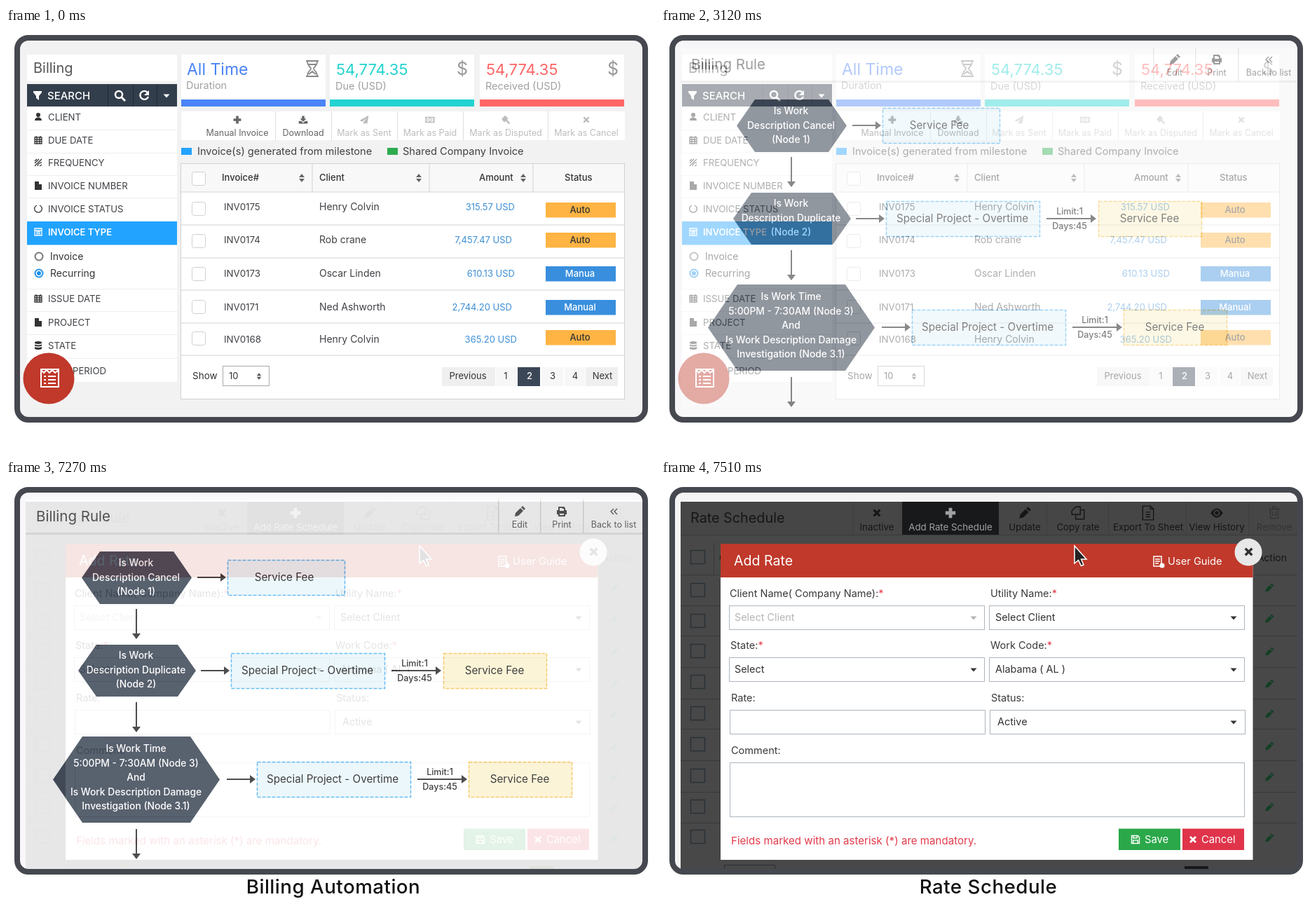
An HTML page for the animation above (8000 ms loop, 926x605 px).

```html
<!DOCTYPE html>
<html lang="en">
<head>
<meta charset="utf-8">
<title>Billing tour</title>
<style>
html, body { margin: 0; width: 100%; height: 100%; overflow: hidden; background: #fff; }
svg { display: block; width: 926px; height: 605px; }
text { font-family: Inter, "Open Sans", sans-serif; white-space: pre; }
</style>
</head>
<body>
<svg id="stage" viewBox="0 0 926 605"></svg>
<script>
const rect = (x, y, w, h, fill, more = '') =>
  `<rect x="${x}" y="${y}" width="${w}" height="${h}" fill="${fill}" ${more}/>`;
const box = (x, y, w, h, stroke, fill = '#fff', more = '') =>
  rect(x + .5, y + .5, w, h, fill, `stroke="${stroke}" ${more}`);
const text = (x, y, str, size, fill = '#3c3c3c', more = '') =>
  `<text x="${x}" y="${y}" font-size="${size}" fill="${fill}" ${more}>${str}</text>`;
const MID = 'text-anchor="middle"', END = 'text-anchor="end"', BOLD = 'font-weight="500"';
const mid = (x, y, str, size, fill, more = '') => text(x, y, str, size, fill, MID + ' ' + more);
const shape = (d, fill) => `<path d="${d}" fill="${fill}"/>`;
const line = (d, stroke, w = 1) => `<path d="${d}" fill="none" stroke="${stroke}" stroke-width="${w}"/>`;
const circle = (x, y, r, fill, more = '') => `<circle cx="${x}" cy="${y}" r="${r}" fill="${fill}" ${more}/>`;
const hline = (x1, x2, y, c) => line(`M${x1} ${y + .5}H${x2}`, c);
const vline = (x, y1, y2, c) => line(`M${x + .5} ${y1}V${y2}`, c);
const each = (list, fn) => list.map(fn).join('');

// Icons are centred on 0,0; the flag tells filled from outlined.
const ICONS = {
  plus: [1, 'M-2-6H2V-2H6V2H2V6H-2V2H-6V-2H-2Z'],
  cross: [1, 'M-5-3L-3-5L0-2L3-5L5-3L2 0L5 3L3 5L0 2L-3 5L-5 3L-2 0Z'],
  download: [1, 'M-2-6H2V-2H5L0 3L-5-2H-2ZM-7 2H-3L0 5L3 2H7V6H-7Z'],
  send: [1, 'M7-7L-7 1L-3 3L4-3L-1 4V7L2 5L5 6Z'],
  gavel: [1, 'M-6-2L-1-7L4-2L2 0L7 5L5 7L0 2L-2 4L-6 0Z'],
  cash: [0, 'M-7-4H7V4H-7ZM-2 0A2 3 0 1 0 2 0A2 3 0 1 0-2 0M-5-4V4M5-4V4'],
  user: [1, 'M-3-3A3 3 0 1 1 3-3A3 3 0 1 1-3-3ZM-5 5C-5-1 5-1 5 5Z'],
  calendar: [0, 'M-5-4H5V5H-5ZM-5-1H5M-5 2H5M-2-4V5M2-4V5M-3-6V-4M3-6V-4'],
  waves: [0, 'M-5 1L1-5M-5 5L5-5M-1 5A6 6 0 0 1 5 0M-5-2L-2-5M2 5L5 3'],
  file: [1, 'M-5-6H1V-2H5V6H-5Z'],
  ring: [0, 'M2-5A5.3 5.3 0 1 1-2-5'],
  form: [0, 'M-5-5H5V5H-5ZM-5-2H5M-3 0H3M-3 2.5H3'],
  stack: [1, 'M-5-5Q0-7 5-5V-3Q0-1-5-3ZM-5-1.5Q0 .5 5-1.5V.5Q0 2.5-5 .5ZM-5 2Q0 4 5 2V5Q0 7-5 5Z'],
  sort: [1, 'M-4-1L0-6L4-1ZM-4 1H4L0 6Z'],
  down: [1, 'M-4.5-2.5H4.5L0 2.5Z'],
  filter: [1, 'M-6-6H6V-4L2 1V7L-2 4V1L-6-4Z'],
  pencil: [1, 'M-7 7L-6 2L1-5L5-1L-2 6ZM2-6L4-8L8-4L6-2Z'],
  printer: [1, 'M-5-7H3L5-5V-2H7V4H5V7H-5V4H-7V-2H-5ZM-3-5V-1H3V-4H1V-5ZM-3 3V5H3V3Z'],
  back: [0, 'M0-4L-4 0L0 4M5-4L1 0L5 4'],
  copy: [0, 'M-3-8H3V2H-8V-3ZM3-4H8V8H-3V2'],
  sheet: [0, 'M-7-9H3L7-5V9H-7ZM3-9V-5H7M-3-1H3M-3 2H3M-3 5H3'],
  eye: [1, 'M-8 0Q0-12 8 0Q0 12-8 0ZM-4 0A4 4 0 1 1 4 0A4 4 0 1 1-4 0ZM-2.5 0A2.500 2.500 0 1 0 2.500 0A2.500 2.500 0 1 0-2.500 0Z'],
  trash: [0, 'M-7-5H7M-2-5V-8H2V-5M-5-5V7H5V-5M-2-2V4M2-2V4'],
  disk: [0, 'M-5-5H3L5-3V5H-5ZM-3-5V-2H2V-5M-3 5V1H3V5'],
  hourglass: [0, 'M-9-11H9M-9 11H9M-7-11C-7-3-2-3-2 0C-2 3-7 3-7 11M7-11C7-3 2-3 2 0C2 3 7 3 7 11M-5-6H5M-5 8L0 4L5 8']
};
function icon(name, x, y, color, k = 1, w = 1.3) {
  const [solid, d] = ICONS[name];
  const art = solid ? `<path d="${d}" fill="${color}" fill-rule="evenodd"/>` : line(d, color, w);
  return `<g transform="translate(${x} ${y}) scale(${k})">${art}</g>`;
}

function invoices() {
  const ink = '#3f4145', grid = '#d2d2d2', pale = '#eee', navy = '#333e4c';
  const cards = [
    [250, 'All Time', 'Duration', '#4a84f7', 258, 23, 87],
    [462, '54,774.35', 'Due (USD)', '#22d3d1', 471, 22, 88],
    [676, '54,774.35', 'Received (USD)', '#ff6666', 685, 22, 88]
  ];
  const side = [
    ['user', 'CLIENT', 132], ['calendar', 'DUE DATE', 165], ['waves', 'FREQUENCY', 197],
    ['file', 'INVOICE NUMBER', 230], ['ring', 'INVOICE STATUS', 263], ['calendar', 'ISSUE DATE', 391],
    ['file', 'PROJECT', 425], ['stack', 'STATE', 458]
  ];
  const tools = [
    ['plus', 'Manual Invoice', 330, '#666'], ['download', 'Download', 424, '#666'],
    ['send', 'Mark as Sent', 511], ['cash', 'Mark as Paid', 605],
    ['gavel', 'Mark as Disputed', 713], ['cross', 'Mark as Cancel', 828]
  ];
  const rows = [
    ['0175', 'Henry Colvin', '315.57', 726, 'Auto', 260, 248, 249],
    ['0174', 'Rob crane', '7,457.47', 722, 'Auto', 307, 294, 292],
    ['0173', 'Oscar Linden', '610.13', 726, 'Manua', 355, 341, 340],
    ['0171', 'Ned Ashworth', '2,744.20', 722, 'Manual', 403, 388, 388],
    ['0168', 'Henry Colvin', '365.20', 729, 'Auto', 449, 433, 431]
  ];
  const pages = [[622, 76, 'Previous', 659], [699, 29, '1', 713], [730, 32, '2', 747],
    [764, 31, '3', 780], [797, 29, '4', 812], [827, 46, 'Next', 851]];
  const check = y => box(265, y, 19, 19, '#d0d0d0', '#fff', 'rx="3"');

  return rect(20, 18, 888, 538, '#f2f2f2') +
    rect(30, 38, 214, 38, '#fff') + text(39, 64, 'Billing', 20, '#555') +
    each(cards, ([x, big, small, c, tx, size, y]) => rect(x, 38, 206, 64, '#fff') +
      rect(x, 102, 206, 10, c) + text(tx, 67, big, size, c) + text(tx - 1, y, small, 14.5, '#a0a0a0')) +
    icon('hourglass', 437, 58, '#888', 1, 1.8) +
    mid(651, 67, '$', 25, '#999') + mid(866, 67, '$', 25, '#999') +
    // search bar
    rect(30, 80, 214, 32, navy) + each([145, 181, 215], x => vline(x, 80, 112, '#222b36')) +
    icon('filter', 45, 96, '#fff') + text(59, 102, 'SEARCH', 15, '#fff', BOLD) +
    circle(161, 95, 5, 'none', 'stroke="#fff" stroke-width="2.5"') + line('M164 98L170 104', '#fff', 3) +
    line('M202 92A6 6 0 1 0 203 98', '#fff', 2.4) + shape('M204 89V96H197Z', '#fff') +
    icon('down', 229, 97, '#fff') +
    // filter list
    rect(30, 112, 214, 393, '#fff') +
    each([145, 178, 210, 242, 372, 404, 437, 471], y => hline(30, 244, y, pale)) +
    each(side, ([name, label, y]) => icon(name, 46, y - 5, '#333') + text(60, y, label, 13.2, ink)) +
    text(95, 494, 'PERIOD', 13.2, ink) +
    rect(30, 276, 214, 33.5, '#22a3ff') + icon('form', 46, 291, '#fff') +
    text(60, 296, 'INVOICE TYPE', 13, '#fff', 'font-weight="600"') +
    circle(47, 326, 5.5, '#fff', 'stroke="#777" stroke-width="2"') + text(63, 331, 'Invoice', 14, '#333') +
    circle(47, 350, 5.5, '#fff', 'stroke="#1d92f0" stroke-width="2"') + circle(47, 350, 3, '#1d92f0') +
    text(63, 355, 'Recurring', 14, '#333') +
    // floating button
    circle(61, 500, 36.5, '#c0392b') +
    line('M50 488V512H75V488M49 487H76M50 488L54 492L58 488L62 492L66 488L70 492L75 488M60 497H71M60 502H71M60 507H71M54 497H57M54 502H57M54 507H57', '#fff', 2) +
    // toolbar and legend
    rect(250, 119, 633, 41, '#fff') +
    each([384, 464, 558, 652, 773], x => vline(x, 119, 160, '#ddd')) +
    each(tools, ([name, label, x, c = '#bdbdbd']) => icon(name, x, 131, c, .9) + mid(x, 154, label, 12.5, c)) +
    rect(250, 171, 15, 10, '#22a3ff') + text(273, 181, 'Invoice(s) generated from milestone', 14.6, ink) +
    rect(544, 171, 15, 10, '#2eab4e') + text(566, 181, 'Shared Company Invoice', 14.6, ink) +
    // table
    box(249, 193, 633, 336, grid) + rect(250, 194, 632, 40, '#f8f8f8') +
    each([234, 281, 328, 374, 421, 467], y => hline(250, 882, y - .5, grid)) +
    each([437, 604, 752], x => vline(x - .5, 194, 234, grid)) +
    each([422, 589, 738], x => icon('sort', x, 214, '#666')) +
    each([['Invoice#', 308], ['Client', 447], ['Amount', 675], ['Status', 797]],
      ([s, x]) => text(x, 218, s, 13, '#333', BOLD)) +
    check(205) +
    each(rows, ([no, name, sum, x, kind, y, cy, by]) => check(cy) +
      text(311, y, 'INV' + no, 13.3, ink) + text(447, y - .5, name, 14, ink) +
      text(x, y - .5, sum + ' USD', 13, '#3d8fd6', END) +
      rect(770, by, 100, 21.5, kind == 'Auto' ? '#ffb443' : '#398fde') +
      mid(819, by + 15, kind, 13, kind == 'Auto' ? '#333' : '#fff', BOLD)) +
    text(266, 501, 'Show', 13.5, '#333') + box(309, 482, 66, 28, '#aaa') +
    text(318, 501, '10', 13, '#333') + icon('sort', 361, 497, '#555', .8) +
    each(pages, ([x, w, s, cx]) => rect(x, 484, w, 27, s == 2 ? '#3b4757' : s > 0 ? '#f7f7f7' : '#efefef') +
      mid(cx, 501, s, 13, s == 2 ? '#fff' : '#333', s == 2 ? BOLD : ''));
}

function rules() {
  const dark = '#333';
  const arrow = (x, y, len, turn = 0) => `<g transform="translate(${x} ${y}) rotate(${turn})">` +
    line(`M0 0H${len - 6}`, dark, 2) + shape(`M${len - 8}-6L${len} 0L${len - 8} 6Z`, dark) + '</g>';
  const hex = (x1, x2, y1, y2, inset, y, lines) => {
    const my = (y1 + y2) / 2, a = x1 + inset, b = x2 - inset;
    return shape(`M${x1} ${my}L${a} ${y1}H${b}L${x2} ${my}L${b} ${y2}H${a}Z`, '#404a59') +
      each(lines, (s, i) => mid(185.5, y + i * 20.6, s, 13.8, '#fff', BOLD));
  };
  const fee = (x, y, w, label, cx, warm) =>
    box(x, y, w, 50, warm ? '#f8c35a' : '#55b5f2', warm ? '#fcf3d2' : '#eaf6fb', 'stroke-width="1.5" stroke-dasharray="5 2"') +
    mid(cx, y + 30, label, 15.2, '#222');
  const limit = (x, y) => mid(x, y - 6, 'Limit:1', 12.5, '#222', BOLD) + mid(x, y + 15, 'Days:45', 12.6, '#222', BOLD);
  const special = 'Special Project - Overtime';

  return rect(20, 18, 888, 538, '#faf8fb') + rect(28, 28, 880, 528, '#fff') +
    rect(28, 75, 880, 3, '#ebebeb') + text(43, 59, 'Billing Rule', 20.5, '#555') +
    each([702, 762, 823], x => rect(x, 28, 1.5, 48, '#ddd')) +
    each([['pencil', 'Edit', 733], ['printer', 'Print', 793], ['back', 'Back to list', 867]],
      ([name, s, x]) => icon(name, x, 45, '#555') + mid(x, 68, s, 12.5, '#666')) +
    hex(108, 265, 102, 177, 26, 123, ['Is Work', 'Description Cancel', '(Node 1)']) +
    hex(103, 271, 235, 309, 26, 255, ['Is Work', 'Description Duplicate', '(Node 2)']) +
    hex(67, 305, 366, 489, 42, 388, ['Is Work Time', '5:00PM - 7:30AM (Node 3)', 'And',
      'Is Work Description Damage', 'Investigation (Node 3.1)']) +
    arrow(273, 139, 41) + arrow(278, 272, 41) + arrow(315, 427, 41) +
    arrow(550, 272, 71) + arrow(587, 427, 71) +
    each([184, 317, 498], y => arrow(186, y, 43, 90)) +
    fee(316, 114, 167, 'Service Fee', 397) +
    fee(321, 247, 219, special, 430) + fee(624, 247, 147, 'Service Fee', 697, true) +
    fee(358, 402, 219, special, 466) + fee(660, 402, 147, 'Service Fee', 733, true) +
    limit(583, 272) + limit(619, 427);
}

function rates() {
  const ink = '#161616', rule = '#393939', red = '#e23b4b';
  const tools = [['cross', 'Inactive', 308], ['plus', 'Add Rate Schedule', 413, '#a0a0a0'], ['pencil', 'Update', 519],
    ['copy', 'Copy rate', 595], ['sheet', 'Export To Sheet', 695], ['eye', 'View History', 793],
    ['trash', 'Remove', 875, '#343434']];
  const label = (x, y, s, must) => text(x, y, s + (must ? `<tspan fill="${red}">*</tspan>` : ''), 14.5, '#3a3a3a');
  const field = (x, y, value, tx, c = '#333') => box(x, y, 364, 34, '#adb5bd') +
    (value ? text(tx, y + 22, value, 14.4, c) + icon('down', x < 400 ? 446 : 817, y + 18, c) : '');

  return rect(20, 18, 888, 538, '#f4f4f4') + rect(28, 31, 880, 525, '#484848') +
    rect(28, 31, 880, 47, '#464646') + hline(28, 908, 78, rule) +
    text(42, 61, 'Rate Schedule', 19.8, ink) + rect(344, 31, 138, 47, '#17191b') +
    each([273, 550, 638, 749, 838], x => vline(x, 31, 78, '#3e3e3e')) +
    each(tools, ([name, s, x, c = ink]) => icon(name, x, 47, c, name == 'plus' ? 1.2 : 1.1) + mid(x, 72, s, 13.3, c)) +
    each([135, 179, 222, 267, 312, 355, 400, 445, 489], y => hline(28, 908, y, rule)) +
    vline(75, 90, 135, rule) + text(83, 116, 'Client', 14, ink) + text(893, 116, 'Action', 14, ink, END) +
    each([100, 147, 191, 234, 278, 323, 367, 412, 456, 499], y => box(42, y, 20, 19, '#2b3137', 'none', 'stroke-width="1.5"')) +
    each([154, 198, 245, 291, 334, 380, 424, 467, 511], y => icon('pencil', 868, y, '#123f25', .8)) +
    line('M90.5 556V549.5H162.5V556', '#2b2d30') + rect(747, 551, 34, 5, '#17191b') +
    // dialog
    rect(85, 91, 759.5, 451, '#fff') + rect(85, 91, 759.5, 48, '#c0392b') +
    text(104, 122, 'Add Rate', 19.6, '#fff') + text(723, 121, 'User Guide', 14.7, '#fff') +
    line('M703 109H714V123H703ZM705 113H712M705 116H712M705 119H710', '#fff', 1.5) + circle(715, 122, 3.5, '#fff') +
    circle(838, 103, 19.5, '#e8e8e8') + icon('cross', 838.5, 102.5, '#333', 1.2) +
    label(98, 167, 'Client Name( Company Name):', true) + label(470, 167, 'Utility Name:', true) +
    label(99, 241, 'State:', true) + label(470, 241, 'Work Code:', true) +
    label(100, 316, 'Rate:') + label(471, 316, 'Status:') + label(100, 391, 'Comment:') +
    field(97, 179, 'Select Client', 105, '#b5b5b5') + field(468, 179, 'Select Client', 477) +
    field(97, 253, 'Select', 105) + field(468, 253, 'Alabama ( AL )', 477) +
    field(98, 328) + field(469, 328, 'Active', 480) + box(98, 403, 734, 77, '#adb5bd') +
    text(100, 520, 'Fields marked with an asterisk (*) are mandatory.', 15.1, red) +
    rect(653, 497.5, 88, 30.5, '#2aa84a') + icon('disk', 677, 513, '#fff', 1.1) + text(690, 518, 'Save', 14.8, '#fff') +
    rect(744, 497.5, 88, 30.5, '#e0344a') + icon('cross', 759, 513, '#fff') + text(771, 518, 'Cancel', 14.8, '#fff') +
    '<path d="M590 94V119L595.500 114.500L599.500 122.500L603 121L599.500 113H607Z" fill="#222" stroke="#fff" stroke-width="1.5"/>';
}

const caption = (y, s) => `<g>${mid(467, y, s, 27.7, '#111', BOLD + ' letter-spacing=".5"')}</g>`;
const stage = document.getElementById('stage');
stage.innerHTML = each([invoices, rules, rates], scene => `<g>${scene()}</g>`) +
  '<rect x="16" y="14" width="896" height="545" rx="16" fill="none" stroke="#46484f" stroke-width="8"/>' +
  caption(592, 'Billing Invoice') + caption(589.5, 'Billing Automation') + caption(589.5, 'Rate Schedule');
const [sceneA, sceneB, sceneC, , capA, capB, capC] = stage.children;

const ramp = (t, start, gap, n) => Math.max(0, Math.min(n, Math.floor((t - start) / gap) + 1)) / n;
const fade = (el, a) => el.setAttribute('opacity', a);
function drop(el, a, shown) {
  fade(el, shown ? a : 0);
  el.setAttribute('transform', `translate(0 ${-7 * (1 - a)})`);
}

function draw() {
  const t = performance.now() % 8000;
  fade(sceneB, ramp(t, 3030, 30, 7));
  fade(sceneC, ramp(t, 7270, 30, 8));
  drop(capA, ramp(t, 500, 100, 5), t < 3000);
  drop(capB, ramp(t, 4840, 100, 4), t < 7300);
  fade(capC, t >= 7510 ? 1 : 0);
  requestAnimationFrame(draw);
}
draw();
</script>
</body>
</html>
```
